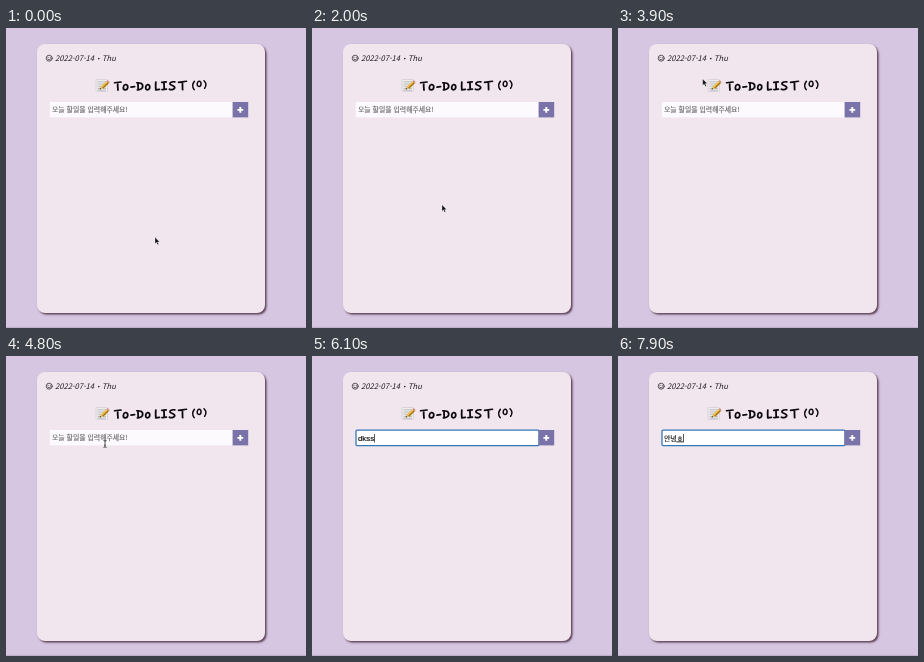
An HTML page that plays this animation: 300x300 px, repeating every 8 s.

```html
<!DOCTYPE html>
<html lang="ko">
<head>
<meta charset="utf-8">
<title>To-Do List</title>
<style>
  html, body { margin: 0; width: 100%; height: 100%; overflow: hidden; background: #d6c6e1; }
  svg { position: absolute; inset: 0; width: 100%; height: 100%; }
  .card { position: absolute; left: 10.2%; top: 5.27%; width: 76.2%; height: 89.8%;
    border-radius: 8px; background: #f1e6ee; box-shadow: 1.5px 1.5px 2px rgba(70, 38, 60, .85); }
  text { font-family: "Noto Sans CJK KR", "Noto Sans CJK", sans-serif; font-size: 6.88px; white-space: pre; }
  .date { font-size: 7.6px; font-style: italic; fill: #1c181c; }
  .hint { fill: #666; font-weight: 500; stroke: #666; stroke-width: .15; }
  .typed { fill: #111; font-weight: 500; stroke: #111; stroke-width: .15; }
  .latin { font: 7.8px "Liberation Sans", Arial, sans-serif; stroke-width: .2; }
  .compose { text-decoration: underline; }
  .pen { fill: none; stroke: #0c090c; stroke-width: 1.8; stroke-linecap: round; stroke-linejoin: round; }
  .status { font-size: 5.7px; fill: #c9c5cc; }
</style>
</head>
<body>
<div class="card"></div>
<svg viewBox="0 0 300 300">
  <path d="M0 299.3H300" stroke="#b9adc4" stroke-width="1"/>

  <!-- date row -->
  <g fill="none" stroke="#2a242a" stroke-width=".75" stroke-linecap="round">
    <circle cx="43.2" cy="30.2" r="3"/>
    <path d="M41.7 31.1Q43.2 32.9 44.7 31.1M42.1 29.3v.1M44.3 29.3v.1"/>
  </g>
  <text class="date" x="49" y="33">2022-07-14</text>
  <circle cx="92.8" cy="30.6" r=".8" fill="#1c181c"/>
  <text class="date" x="96" y="33">Thu</text>

  <!-- memo icon -->
  <rect x="90" y="51.5" width="11.4" height="12" rx=".8" fill="#efecec" stroke="#c2bfc6" stroke-width=".5"/>
  <path d="M91.5 53.8h8.5M91.5 56h8.5M91.5 58.2h8.5M91.5 60.4h8.5M91.5 62.2h8.5" stroke="#a3a8b4" stroke-width=".7"/>
  <path d="M93.6 61.6L94.8 58.4L100.6 53L102.8 55.3L97.2 60.8Z" fill="#eec04a"/>
  <path d="M97.2 60.8L102.8 55.3L101.8 54.2L96.1 59.7Z" fill="#a8741f"/>
  <path d="M100.6 53l.8-.7q1.6.3 2.1 2.3l-.7.7z" fill="#c98780"/>
  <path d="M93.6 61.6L94.8 58.4L97.2 60.8Z" fill="#e3c48e"/>
  <path d="M93.6 61.6l.5-1.6 1.2 1z" fill="#2d2525"/>

  <!-- handwritten heading -->
  <g class="pen" role="img" aria-label="TO-DO LIST (0)" transform="translate(0 4) scale(1 .93)">
    <path d="M108.6 54.6L115 53.8M111.8 54.4Q111.4 58.5 112 62.4"/>
    <path d="M119.4 56.5C116.8 57.2 116.6 62.2 119.2 62.3C122.6 62.2 122.6 56.2 119.4 56.5Z"/>
    <path d="M125 59.2L128.6 58.8"/>
    <path d="M132 54.8L132.2 62.2M130.8 54.6C138.9 54 138.3 61.6 131.4 62.3"/>
    <path d="M141.6 56.5C139.2 57.2 139 62.1 141.4 62.2C144.5 62 144.5 56.3 141.6 56.5Z"/>
    <path d="M149.8 53.8Q149.5 58 149.8 62.2L153.4 61.7"/>
    <path d="M155.8 54.2L160.2 53.7M158 54L158.2 61.7M156 62L160.4 61.5"/>
    <path d="M168.8 53.6C165 53 162.6 55.4 164.8 56.8C167 58 169.4 58.4 168.6 60.4C167.8 62.3 165 62.3 163.4 61.5"/>
    <path d="M172.6 54.2L180.4 53M176.4 53.8L176.6 62"/>
    <path d="M188.4 53Q185 57.5 188.2 62" stroke-width="1.5"/>
    <path d="M193 52.9C190.6 53.8 190.5 58.5 193 58.6C195.8 58.4 195.7 52.6 193 52.9Z" stroke-width="1.5"/>
    <path d="M198 52.3Q201.6 55.8 198.6 60.6" stroke-width="1.5"/>
  </g>

  <!-- input row -->
  <rect x="43.8" y="74" width="183" height="15.4" fill="#fdfafd"/>
  <rect id="ring" x="44" y="74.2" width="183" height="15.4" rx="1" fill="#fff" stroke="#3576b4" stroke-width="1.3"/>
  <rect x="226.6" y="74" width="15.6" height="15.4" fill="#7a73a9"/>
  <path d="M231.4 81.9h5.8M234.3 79v5.8" stroke="#fff" stroke-width="1.9"/>
  <text id="hint" class="hint" x="46" y="84.3">오늘 할일을 입력해주세요!</text>
  <text id="typed" class="typed" x="46" y="84.5"><tspan id="done"></tspan><tspan id="compose" class="compose"></tspan></text>
  <rect id="caret" y="78" width=".7" height="8.4" fill="#111"/>

  <!-- browser status -->
  <g id="status">
    <path d="M0 291.6H90Q92.4 291.6 92.4 294V300H0Z" fill="#4c4851"/>
    <text class="status" x="86.5" y="298.2" text-anchor="end">olm.github.io에 응답을 기다리는 중...</text>
  </g>

  <g id="mouse">
    <path id="arrow" d="M0 0V6.3L1.5 5L2.5 7.4L3.6 6.9L2.6 4.6H4.5Z" fill="#111" stroke="#fff" stroke-width=".3"/>
    <path id="beam" d="M-1.5 -3.5Q0 -3.5 0 -2.5Q0 -3.5 1.5 -3.5M0 -2.5V2.5M-1.5 3.5Q0 3.5 0 2.5Q0 3.5 1.5 3.5M-.8 1.2H.8" fill="none" stroke="#222" stroke-width=".75"/>
  </g>
</svg>
<script>
const LOOP = 8000, STEP = 100, FOCUS = 4900, TYPING = 5800;
const el = id => document.getElementById(id);
const show = (node, on) => node.setAttribute("visibility", on ? "visible" : "hidden");
const [ring, hint, typed, done, compose, caret, status_, mouse, arrow, beam] =
  ["ring", "hint", "typed", "done", "compose", "caret", "status", "mouse", "arrow", "beam"].map(el);

// time, x, y of the pointer
const path = [
  [1900, 149, 209.3], [2200, 92, 112], [2500, 14, 14], [2700, 63, 32.5], [2800, 58, 31],
  [2900, 45, 31], [3100, 74, 31], [3300, 99, 32], [3500, 98, 50], [3700, 88, 52],
  [3900, 84.7, 51], [4300, 87, 53], [4600, 92, 72], [4800, 99, 88], [5000, 123.5, 88]
];
// time, finished text, syllable being composed
const keys = [
  [0, "", ""], [5800, "d", ""], [5900, "dk", ""], [6000, "dks", ""], [6100, "dkss", ""],
  [6300, "dks", ""], [6500, "dk", ""], [6600, "d", ""], [6800, "", ""],
  [7100, "", "ㅇ"], [7200, "", "아"], [7300, "", "안"], [7500, "안", "ㄴ"],
  [7600, "안", "녀"], [7700, "안", "녕"], [7900, "안녕", "ㅎ"]
];

function pointAt(t) {
  const i = path.findIndex(p => p[0] > t);
  if (i === 0) return path[0].slice(1);
  if (i < 0) return path.at(-1).slice(1);
  const [t0, x0, y0] = path[i - 1], [t1, x1, y1] = path[i];
  const k = (t - t0) / (t1 - t0);
  return [x0 + (x1 - x0) * k, y0 + (y1 - y0) * k];
}

function statusAlpha(t) {
  if (t < 700 || t >= 1200) return 0;
  return t < 1000 ? 1 : t < 1100 ? .95 : .82;
}

function draw(t) {
  status_.setAttribute("opacity", statusAlpha(t));

  const [x, y] = pointAt(t);
  const overDate = x > 40 && x < 109 && y > 25 && y < 36;
  const overInput = y > 74 && y < 90 && x > 44 && x < 226;
  const text = overDate || overInput, shown = t < TYPING;
  mouse.setAttribute("transform", `translate(${x} ${y})`);
  show(arrow, shown && !text);
  show(beam, shown && text);

  const [, a, b] = keys.findLast(k => k[0] <= t);
  done.textContent = a;
  compose.textContent = b;
  typed.classList.toggle("latin", /[a-z]/.test(a));
  show(hint, !(a + b));

  show(ring, t >= FOCUS);
  const lit = t >= TYPING || (t - FOCUS) % 1000 < 500;
  show(caret, t >= FOCUS && lit);
  caret.setAttribute("x", 46 + (a + b ? typed.getComputedTextLength() : 0));
}

const start = performance.now();
function tick() {
  const t = (performance.now() - start) % LOOP;
  draw(Math.floor(t / STEP) * STEP);
  requestAnimationFrame(tick);
}
tick();
</script>
</body>
</html>
```
